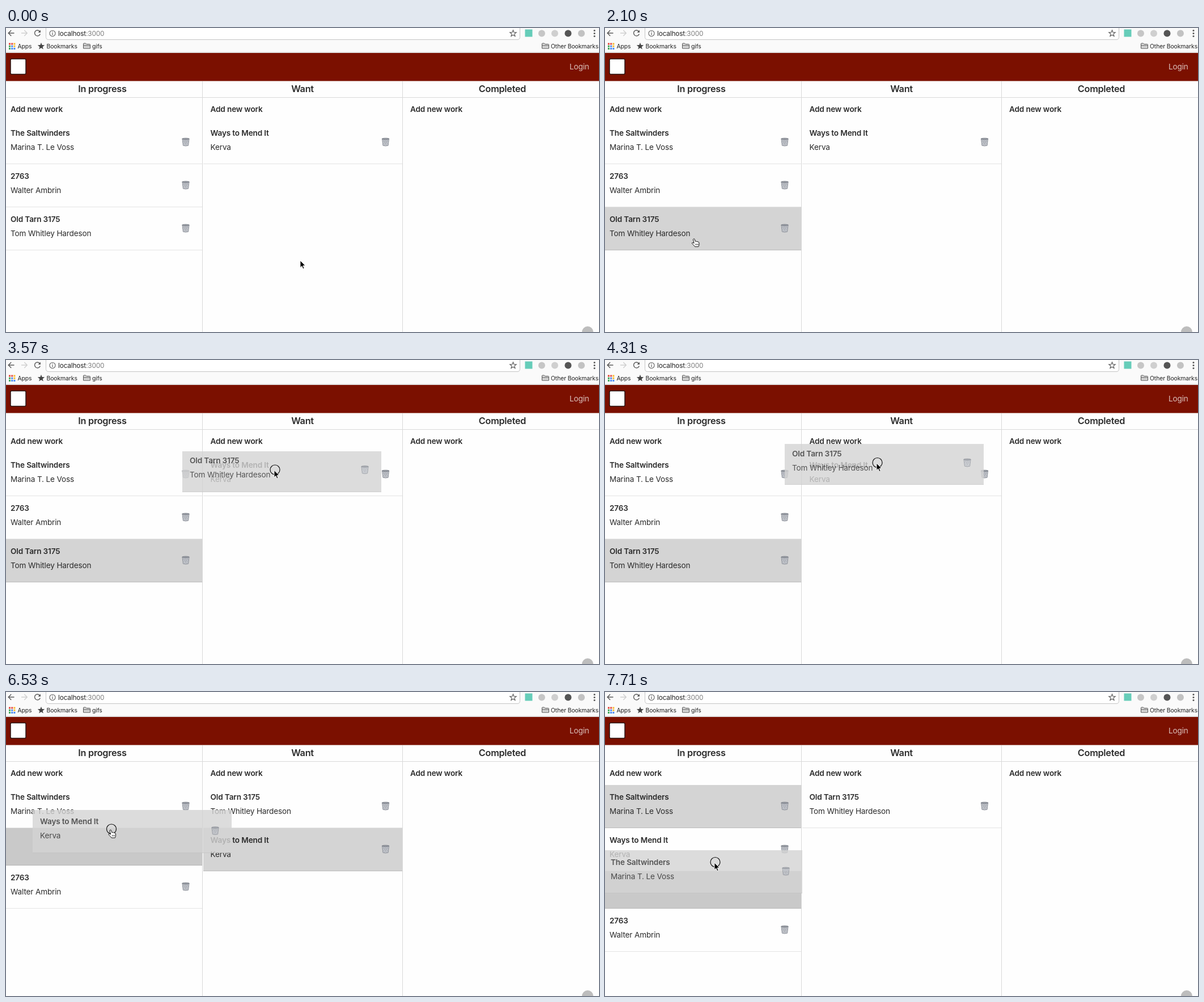
Write an HTML page that moves like this. It is 1046x536 px and loops after 8 s.

```html
<!DOCTYPE html>
<html lang="en">
<head>
<meta charset="utf-8">
<title>Reading board</title>
<style>
  html, body { margin: 0; width: 100%; height: 100%; overflow: hidden; background: #fefefe; }
  svg { display: block; width: 100%; height: 100%; }
  text { font-family: Inter, Roboto, sans-serif; font-size: 13.6px; letter-spacing: -.15px; fill: #2b2b2b; }
  .bold { font-weight: 600; }
  .head { font-weight: 600; font-size: 16.3px; letter-spacing: -.3px; text-anchor: middle; }
  .small { font-size: 10.4px; letter-spacing: -.1px; fill: #222; }
  .url { font-size: 11.8px; fill: #222; }
  .icon { fill: none; stroke: #5a5a5a; stroke-width: 1.4; }
  .crisp { shape-rendering: crispEdges; }
</style>
</head>
<body>
<svg viewBox="0 0 1046 536">
  <defs>
    <g id="trash">
      <path d="M-6-5.5L-4.6 6.2Q0 7.8 4.6 6.2L6-5.5Z" fill="#c3c6cc" stroke="#868b94" stroke-width=".9"/>
      <path d="M-4-4L2.5 6.5M-1-4L4 4M2-4L4.8.5M4-4L-2.5 6.5M1-4L-4 4M-2-4L-4.8.5" stroke="#92969e" stroke-width=".5"/>
      <ellipse cy="-5.6" rx="6.4" ry="1.2" fill="#979ba3" stroke="#737881" stroke-width=".8"/>
    </g>
    <g id="folder" fill="#d8d8d8" stroke="#555">
      <path d="M.5 9.5V1.5Q.5.5 1.5.5H4.5L6 2H11.5Q12.5 2 12.5 3V9.5Z"/>
      <path d="M.5 4.5H12.5" fill="none"/>
    </g>
  </defs>

  <rect width="1046" height="536" fill="#fefefe"/>

  <!-- browser bars -->
  <rect width="1046" height="43" fill="#fafafa"/>
  <path d="M70.5-5V15.5Q70.5 20.5 75.5 20.5H902Q906.5 20.5 906.5 15.5V-5Z" fill="#fff" stroke="#c4c4c4"/>
  <path class="icon" d="M14.5 9H4.5M9.2 4L4.2 9L9.2 14"/>
  <path class="icon" style="stroke:#cfcfcf" d="M27 9H37M32.300 4L37.300 9L32.300 14"/>
  <path class="icon" d="M59.600 6A5 5 0 1 0 60.300 10.500"/>
  <path d="M61 3.500V8H56.500Z" fill="#5a5a5a"/>
  <circle class="icon" cx="82" cy="9.500" r="5" style="stroke-width:1.1"/>
  <path d="M82 8.700V12.300M82 6.300V7.500" stroke="#555" stroke-width="1.200"/>
  <text class="url" x="92" y="13.700">localhost<tspan fill="#7c7c7c">:3000</tspan></text>
  <path id="star" class="icon" style="stroke-width:1.1"/>
  <rect x="915.500" y="2.500" width="13" height="13" fill="#66cdb9"/>
  <circle cx="945" cy="9.500" r="6" fill="#c6c6c6"/>
  <circle cx="968" cy="9.500" r="6" fill="#cfcfcf"/>
  <circle cx="991.500" cy="9.500" r="6" fill="#555"/>
  <circle cx="1015" cy="9.500" r="6" fill="#c2c2c2"/>
  <g fill="#555"><circle cx="1038" cy="4.500" r="1.500"/><circle cx="1038" cy="9.500" r="1.500"/><circle cx="1038" cy="14.500" r="1.500"/></g>
  <g id="apps"></g>
  <path id="mark" fill="#444"/>
  <use href="#folder" x="136" y="26.500"/>
  <use href="#folder" x="945" y="26.500"/>
  <text class="small" x="20.500" y="35.700">Apps</text>
  <text class="small" x="71.500" y="35.700">Bookmarks</text>
  <text class="small" x="152" y="35.700">gifs</text>
  <text class="small" x="961" y="35.700">Other Bookmarks</text>
  <path d="M0 43H1046" stroke="#c9c9c9"/>

  <!-- page header -->
  <rect y="44" width="1046" height="49.500" fill="#7b1000"/>
  <rect x="8" y="54.500" width="27" height="27" rx="2" fill="#fff" stroke="#2a1512" stroke-width="1.500"/>
  <text x="994" y="73" style="fill:#dcc2bd">Login</text>

  <!-- columns -->
  <text class="head" x="170" y="113">In progress</text>
  <text class="head" x="523" y="113">Want</text>
  <text class="head" x="875.500" y="113">Completed</text>
  <path class="crisp" d="M0 122.500H1046" stroke="#d9d9d9"/>
  <text class="bold" x="8" y="148">Add new work</text>
  <text class="bold" x="360.500" y="148">Add new work</text>
  <text class="bold" x="713" y="148">Add new work</text>
  <g id="gap" class="crisp">
    <rect width="346" height="66" fill="#c9c9c9"/>
    <path d="M0 65.500H346" stroke="#b9b9b9"/>
  </g>
  <g id="rows"></g>
  <path class="crisp" d="M346.500 94V536M699.500 94V536" stroke="#d9d9d9"/>
  <circle cx="1026" cy="536" r="10" fill="#bdbdbd"/>

  <g id="ghosts" opacity=".8"></g>
  <g id="cursor">
    <circle id="ring" cx="1.500" cy="-1" r="8.500" fill="none" stroke="#111" stroke-width="1.200"/>
    <path id="arrow" d="M0 0V12.500L2.900 9.800L4.900 14.600L7 13.700L5 9H9Z" fill="#000" stroke="#fff" stroke-width=".9"/>
    <g id="hand" stroke="#111" stroke-linejoin="round">
      <path fill="#fff" d="M-1.600 1.600Q-.5-.3 1 1.200L2.300 5.300Q4 4.300 4.800 5.600Q6.300 4.800 7 6.200Q8.600 5.900 8.900 7.600L9 11Q8.600 13 7.800 14.600H1.600Q.3 12.200-3.400 9.200Q-4.200 7.400-2.200 7.300L.1 8.500Z"/>
      <path d="M3 9.500V12M5 9.500V12M7 9.500V12" stroke-width=".8"/>
    </g>
  </g>
</svg>

<script>
const LOOP = 8000, TOP = 164, ROW_H = 76, GAP_H = 66, LEFT = [-5, 347.5];
const $ = id => document.getElementById(id);

const books = {
  salt: ['The Saltwinders', 'Marina T. Le Voss'],
  year: ['2763', 'Walter Ambrin'],
  tarn: ['Old Tarn 3175', 'Tom Whitley Hardeson'],
  mend: ['Ways to Mend It', 'Kerva']
};

// Screen refreshes: first, last, count
const bursts = [
  [450, 1370, 7], [1510, 2550, 8], [2690, 3720, 8], [3870, 4310, 4],
  [4610, 5200, 5], [5650, 6680, 8], [6980, 7710, 6]
];
const ticks = [0];
for (const [a, b, n] of bursts)
  for (let i = 0; i < n; i++) ticks.push(Math.floor((a + (b - a) * i / (n - 1)) / 10) * 10);

// Pointer path: time, x, y
const path = [
  [0, 519, 410], [450, 505, 430], [600, 470, 479], [900, 320, 430], [1060, 210, 350],
  [1370, 147, 184], [1510, 148, 200], [1800, 153, 280], [2100, 157, 371], [2250, 158, 376],
  [2550, 157, 354], [2690, 157, 354], [2830, 285, 351], [3130, 490, 215], [3270, 507, 172],
  [3570, 473, 194.5], [3720, 474, 183], [4010, 478, 152], [4310, 479, 182], [4610, 481, 188],
  [4900, 486, 250], [5200, 484.5, 277.5], [5650, 485, 275], [6090, 300, 262], [6380, 196, 246],
  [6530, 184.5, 242.5], [6680, 186, 245], [6980, 189, 205], [7120, 191, 186], [7710, 193, 301]
];

const hovers = [
  [0, ''], [1060, 'tarn'], [1210, 'year'], [1510, 'salt'], [1800, 'year'], [1950, 'tarn'],
  [4610, ''], [4750, 'tarn'], [4900, 'mend'], [6980, 'salt']
];
const boards = [
  [0, [['salt', 'year', 'tarn'], ['mend']]],
  [4610, [['salt', 'year'], ['tarn', 'mend']]],
  [6680, [['salt', 'mend', 'year'], ['tarn']]]
];
const gaps = [[0, -1], [6230, 1], [6680, -1], [7560, 2]];
const shapes = [[0, 'arrow'], [1060, 'hand'], [2830, 'arrow'], [4750, 'hand'], [7270, 'arrow']];
const drags = [
  { id: 'tarn', press: 2690, move: 2830, drop: 4610, grab: [157, 354], home: [-5, 316], cut: 4 },
  { id: 'mend', press: 5650, move: 5790, drop: 6680, grab: [485, 275], home: [347.5, 240], cut: 0 },
  { id: 'salt', press: 7120, move: 7270, drop: LOOP, grab: [191, 186], home: [-5, 164], cut: 0 }
];

function last(list, t) {
  let value = list[0][1];
  for (const [at, v] of list) if (at <= t) value = v;
  return value;
}

function pointer(t) {
  const i = path.findIndex(p => p[0] > t);
  if (i < 0) return path[path.length - 1].slice(1);
  const [a, b] = [path[i - 1], path[i]], k = (t - a[0]) / (b[0] - a[0]);
  return [a[1] + (b[1] - a[1]) * k, a[2] + (b[2] - a[2]) * k];
}

function make(tag, parent, attrs = {}, text = '') {
  const el = document.createElementNS('http://www.w3.org/2000/svg', tag);
  for (const key in attrs) el.setAttribute(key, attrs[key]);
  el.textContent = text;
  return parent.appendChild(el);
}

function makeRow(id, parent, cut = 0) {
  const g = make('g', parent);
  const back = make('rect', g, { class: 'crisp', y: cut, width: 351, height: ROW_H - cut, fill: '#d4d4d4' });
  const line = make('path', g, { class: 'crisp', d: 'M0 75.5H351', stroke: '#c4c4c4' });
  make('text', g, { class: 'bold', x: 13, y: 25.6 }, books[id][0]);
  make('text', g, { x: 13, y: 50.6 }, books[id][1]);
  make('use', g, { href: '#trash', x: 322, y: 37 });
  return { g, back, line };
}

const show = (el, on) => el.setAttribute('display', on ? 'inline' : 'none');
const place = (el, x, y) => el.setAttribute('transform', `translate(${x} ${y})`);

function starPath(cx, cy, r) {
  const points = Array.from({ length: 10 }, (_, i) => {
    const a = i * Math.PI / 5 - Math.PI / 2, d = i % 2 ? r * .42 : r;
    return (cx + d * Math.cos(a)).toFixed(2) + ' ' + (cy + d * Math.sin(a)).toFixed(2);
  });
  return 'M' + points.join('L') + 'Z';
}

$('star').setAttribute('d', starPath(894.5, 9.7, 6));
$('mark').setAttribute('d', starPath(62, 32.3, 6.5));
['#e8453c', '#e8453c', '#f9bb2d', '#3aa757', '#4688f1', '#f9bb2d', '#3aa757', '#4688f1', '#4688f1']
  .forEach((fill, i) => make('rect', $('apps'),
    { x: 5 + i % 3 * 4.2, y: 26.5 + Math.floor(i / 3) * 4.2, width: 3, height: 3, fill }));

const rows = {};
for (const id in books) rows[id] = makeRow(id, $('rows'));
for (const d of drags) d.ghost = makeRow(d.id, $('ghosts'), d.cut).g;

function draw(time) {
  const t = ticks.filter(k => k <= time).pop();
  const hover = last(hovers, t), gap = last(gaps, t), shape = last(shapes, t);
  const [x, y] = pointer(t);

  show($('gap'), gap >= 0);
  place($('gap'), 0, TOP + gap * ROW_H);
  last(boards, t).forEach((ids, col) => ids.forEach((id, i) => {
    const { g, back, line } = rows[id], on = id === hover;
    place(g, LEFT[col], TOP + i * ROW_H + (col === 0 && gap >= 0 && i >= gap ? GAP_H : 0));
    show(back, on);
    line.setAttribute('stroke', on ? '#bcbcbc' : '#e4e4e4');
  }));

  for (const d of drags) {
    show(d.ghost, t >= d.move && t < d.drop);
    place(d.ghost, d.home[0] + x - d.grab[0], d.home[1] + y - d.grab[1]);
  }
  place($('cursor'), x, y);
  show($('ring'), drags.some(d => t >= d.press && t < d.drop));
  show($('arrow'), shape === 'arrow');
  show($('hand'), shape === 'hand');
}

function frame() {
  draw(performance.now() % LOOP);
  requestAnimationFrame(frame);
}
frame();
</script>
</body>
</html>
```
